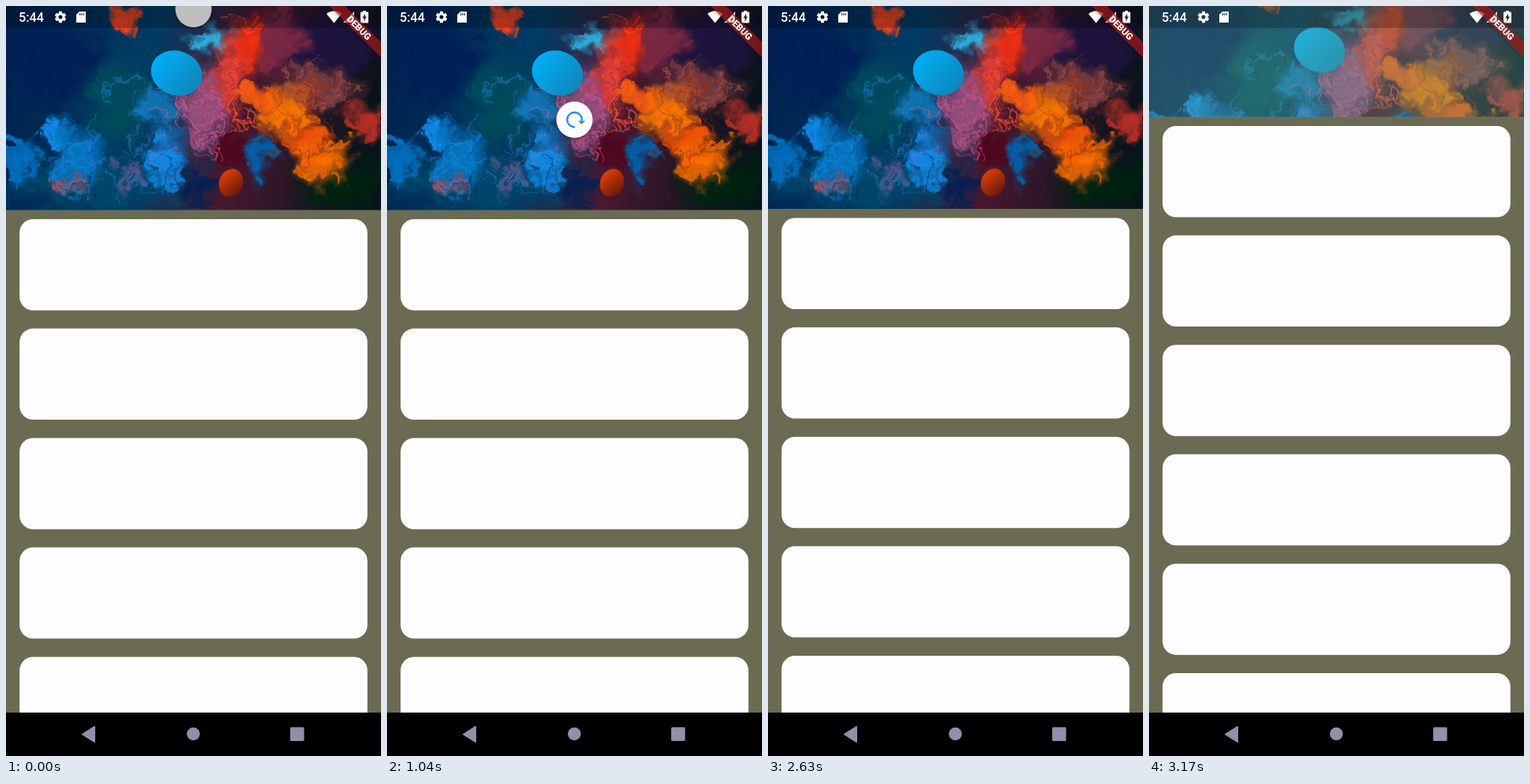
These frames come from a looping animation (475x950 px, 3.21 s). An HTML page with a canvas:

```html
<!DOCTYPE html>
<html lang="en">
<head>
<meta charset="utf-8">
<title>Pull to refresh</title>
<style>
html, body { margin: 0; width: 100%; height: 100%; overflow: hidden; background: #000; }
canvas { display: block; }
svg { position: absolute; }
</style>
</head>
<body>
<svg width="0" height="0">
  <filter id="swirl" x="0" y="0" width="1" height="1" color-interpolation-filters="sRGB">
    <feTurbulence type="fractalNoise" baseFrequency=".035" numOctaves="4" seed="4"/>
    <feDisplacementMap in="SourceGraphic" scale="42" xChannelSelector="R" yChannelSelector="G"/>
  </filter>
</svg>
<canvas id="stage" width="475" height="950"></canvas>
<script>
const ctx = document.getElementById('stage').getContext('2d');
const W = 475, LOOP = 3210, HEADER = 258.5, TAU = Math.PI * 2;

const PULL = [[0, 4], [540, 57], [570, 57], [760, 103], [920, 130], [1040, 144], [1560, 144], [1600, 134], [1720, 70]];
const SCROLL = [[2600, 0], [2640, 1.5], [2800, 35], [2960, 71], [3160, 118]];

const clamp = (v, lo = 0, hi = 1) => Math.min(hi, Math.max(lo, v));

function track(keys, t) {
  if (t <= keys[0][0]) return keys[0][1];
  for (let i = 1; i < keys.length; i++) {
    const [t0, a] = keys[i - 1], [t1, b] = keys[i];
    if (t <= t1) return a + (b - a) * (t - t0) / (t1 - t0);
  }
  return keys[keys.length - 1][1];
}

function circle(c, x, y, r) {
  c.beginPath();
  c.arc(x, y, r, 0, TAU);
  c.fill();
}

function polygon(points) {
  ctx.beginPath();
  points.forEach(([x, y]) => ctx.lineTo(x, y));
  ctx.closePath();
  ctx.fill();
}

function rounded(x, y, w, h, r) {
  ctx.beginPath();
  ctx.roundRect(x, y, w, h, r);
  ctx.fill();
}

// Coloured ink clouds: x, y, rx, ry, colour
const CLOUDS = [
  [55, 65, 62, 62, '#002058'], [140, 120, 40, 60, '#004c5c'],
  [110, 225, 130, 34, '#00486c'], [400, 45, 70, 45, '#1c1440'],
  [425, 225, 60, 36, '#002410'], [345, 45, 34, 40, '#802a44'],
  [240, 235, 26, 26, '#082050'], [15, 195, 24, 30, '#0070c0'],
  [62, 160, 14, 22, '#1090f0'], [95, 190, 34, 36, '#0878c8'],
  [75, 225, 16, 15, '#a05060'], [155, 215, 18, 20, '#50588c'],
  [190, 130, 28, 22, '#1278b8'], [318, 193, 20, 32, '#0064b0'],
  [250, 125, 30, 56, '#9c5080'], [203, 192, 26, 38, '#1090f0'],
  [263, 42, 30, 15, '#30b4e4'], [150, 14, 18, 22, '#f04420'],
  [304, 52, 24, 40, '#f83010'], [282, 95, 22, 46, '#d83c38'],
  [395, 105, 55, 28, '#803c40'], [452, 150, 25, 24, '#b83028'],
  [318, 114, 28, 16, '#ff6010'], [354, 136, 34, 32, '#ff7800'],
  [378, 172, 24, 22, '#f05008'], [402, 196, 36, 30, '#ff6c00'],
  [280, 182, 16, 22, '#50081c']
];

function paintInk() {
  const layer = () => {
    const canvas = document.createElement('canvas');
    canvas.width = W;
    canvas.height = 260;
    return [canvas, canvas.getContext('2d')];
  };
  const [raw, c] = layer(), [ink, out] = layer();
  let seed = 11;
  const rnd = () => (seed = seed * 16807 % 2147483647) / 2147483647;

  const base = out.createLinearGradient(0, 0, W, 90);
  base.addColorStop(0, '#00204c');
  base.addColorStop(.4, '#003c64');
  base.addColorStop(.65, '#481830');
  base.addColorStop(1, '#08141c');
  out.fillStyle = base;
  out.fillRect(0, 0, W, 260);

  for (const [x, y, rx, ry, colour] of CLOUDS) {
    c.save();
    c.translate(x, y);
    c.scale(rx, ry);
    const glow = c.createRadialGradient(0, 0, .45, 0, 0, 1.25);
    glow.addColorStop(0, colour + 'e0');
    glow.addColorStop(1, colour + '00');
    c.fillStyle = glow;
    circle(c, 0, 0, 1.25);
    c.restore();
    c.fillStyle = colour + 'a0';
    for (let i = 0; i < 20; i++) {
      const a = rnd() * TAU, d = Math.sqrt(rnd());
      circle(c, x + Math.cos(a) * d * rx, y + Math.sin(a) * d * ry, 1.5 + rnd() * Math.min(rx, ry) * .22);
    }
  }

  // Thin curling wisps
  const wisps = (n, x, y, w, h, colour) => {
    c.strokeStyle = colour + '90';
    for (let i = 0; i < n; i++) {
      c.lineWidth = 1 + rnd() * 2;
      c.beginPath();
      c.ellipse(x + rnd() * w, y + rnd() * h, 4 + rnd() * 22, 4 + rnd() * 14,
        rnd() * TAU, 0, 1.5 + rnd() * 3);
      c.stroke();
    }
  };
  wisps(16, 140, 100, 60, 130, '#1878c0');
  wisps(22, 200, 105, 70, 85, '#d0588c');
  wisps(16, 20, 150, 110, 90, '#1088d8');
  wisps(18, 40, 150, 200, 90, '#003058');
  wisps(16, 350, 70, 100, 60, '#b05448');
  wisps(12, 320, 110, 100, 90, '#a02c08');
  wisps(14, 270, 20, 45, 130, '#ff5030');

  out.filter = 'url(#swirl)';
  out.drawImage(raw, 0, 0);
  out.filter = 'none';

  const bulb = (x, y, rx, ry, light, dark) => {
    const g = out.createLinearGradient(x - rx, y - ry, x + rx, y + ry);
    g.addColorStop(0, light);
    g.addColorStop(1, dark);
    out.fillStyle = g;
    out.beginPath();
    out.ellipse(x, y, rx, ry, .35, 0, TAU);
    out.fill();
  };
  bulb(216, 85, 33, 28, '#00b4ff', '#1080b0');
  bulb(285, 224, 15, 18, '#f84800', '#501010');
  return ink;
}

const ink = paintInk();

function drawPage(scroll) {
  ctx.fillStyle = '#6b6b54';
  ctx.fillRect(0, 0, W, 895);
  ctx.fillStyle = '#fdfdff';
  for (let i = 0; i < 6; i++) rounded(17.2, 270 + i * 138.6 - scroll, 440.6, 115.5, 17);

  ctx.save();
  ctx.beginPath();
  ctx.rect(0, 0, W, HEADER - scroll);
  ctx.clip();
  ctx.fillStyle = '#69af96';
  ctx.fillRect(0, 0, W, HEADER);
  ctx.globalAlpha = clamp(1 - (scroll - 101) / 52);
  ctx.drawImage(ink, 0, -scroll / 4);
  ctx.restore();
}

function drawSpinner(t) {
  const size = clamp((2040 - t) / 200);
  if (!size) return;
  const y = track(PULL, t), spinning = t >= 1600;
  ctx.save();
  ctx.translate(237.5, y);
  ctx.scale(size, size);
  ctx.shadowColor = 'rgba(0,0,0,.35)';
  ctx.shadowBlur = 4;
  ctx.shadowOffsetY = 1.5;
  ctx.fillStyle = '#fdfdff';
  circle(ctx, 0, 0, 23);
  ctx.shadowColor = 'transparent';

  ctx.globalAlpha = clamp((y - 4) / 110);
  ctx.strokeStyle = ctx.fillStyle = '#2d8ceb';
  ctx.lineWidth = 2.4;
  ctx.rotate(spinning ? (t - 1600) / 160 : (y - 103) * .02);
  const end = spinning ? TAU : 5.6;
  const sweep = spinning ? 5.1 : 4.9 * clamp(y / 95);
  ctx.beginPath();
  ctx.arc(0, 0, 9.3, end - sweep, end);
  ctx.stroke();
  if (!spinning) polygon([[4, -2.5], [10.5, -9], [10.5, -2.5]]);
  ctx.restore();
}

function drawBanner() {
  ctx.save();
  ctx.translate(W, 0);
  ctx.rotate(Math.PI / 4);
  ctx.shadowColor = 'rgba(0,0,0,.5)';
  ctx.shadowBlur = 6;
  ctx.fillStyle = 'rgba(183,28,28,.63)';
  ctx.fillRect(-46.2, 32.3, 92.4, 13.9);
  ctx.shadowColor = 'transparent';
  ctx.fillStyle = '#fff';
  ctx.font = '900 11.8px Roboto, sans-serif';
  ctx.textAlign = 'center';
  ctx.textBaseline = 'middle';
  ctx.fillText('DEBUG', 0, 39.8);
  ctx.restore();
}

function drawStatus() {
  ctx.fillStyle = '#fff';
  ctx.font = '500 16.2px Roboto, sans-serif';
  ctx.fillText('5:44', 16, 20);

  // Gear
  ctx.save();
  ctx.translate(69, 14);
  for (let i = 0; i < 6; i++) {
    ctx.fillRect(-2, -7.2, 4, 4);
    ctx.rotate(TAU / 6);
  }
  ctx.lineWidth = 3;
  ctx.strokeStyle = '#fff';
  ctx.beginPath();
  ctx.arc(0, 0, 4, 0, TAU);
  ctx.stroke();
  ctx.restore();

  // Memory card
  polygon([[93, 7], [101, 7], [101, 21], [89, 21], [89, 11]]);
  ctx.fillStyle = '#345';
  for (let i = 0; i < 3; i++) ctx.fillRect(93 + i * 2.4, 9, 1.2, 3);

  // Wi-Fi, signal, battery
  ctx.fillStyle = '#fff';
  ctx.beginPath();
  ctx.moveTo(415.5, 21.5);
  ctx.lineTo(406, 10);
  ctx.quadraticCurveTo(415.5, 2.5, 425, 10);
  ctx.fill();
  polygon([[427, 21], [441, 21], [441, 7]]);
  rounded(449, 7.5, 10, 14, 1);
  ctx.fillRect(452, 6, 4, 2);
  ctx.fillStyle = '#402020';
  polygon([[455, 9.5], [451.3, 15.2], [453.4, 15.2], [453.4, 19.5], [456.9, 13.6], [455, 13.6]]);
}

function drawNav() {
  ctx.fillStyle = '#000';
  ctx.fillRect(0, 895, W, 55);
  ctx.fillStyle = ctx.strokeStyle = '#9090aa';
  ctx.lineJoin = 'round';
  ctx.lineWidth = 2;
  polygon([[97, 922.5], [112, 913], [112, 932]]);
  ctx.stroke();
  circle(ctx, 237.3, 922, 8.3);
  rounded(360, 913.4, 17.6, 17.6, 1.5);
}

function draw() {
  const now = performance.now() % LOOP;
  const t = Math.floor((now + 10) / 40) * 40;
  drawPage(track(SCROLL, t));
  drawSpinner(t);
  ctx.fillStyle = 'rgba(0,0,0,.25)';
  ctx.fillRect(0, 0, W, 27.7);
  drawStatus();
  drawBanner();
  drawNav();
  requestAnimationFrame(draw);
}
draw();
</script>
</body>
</html>
```
